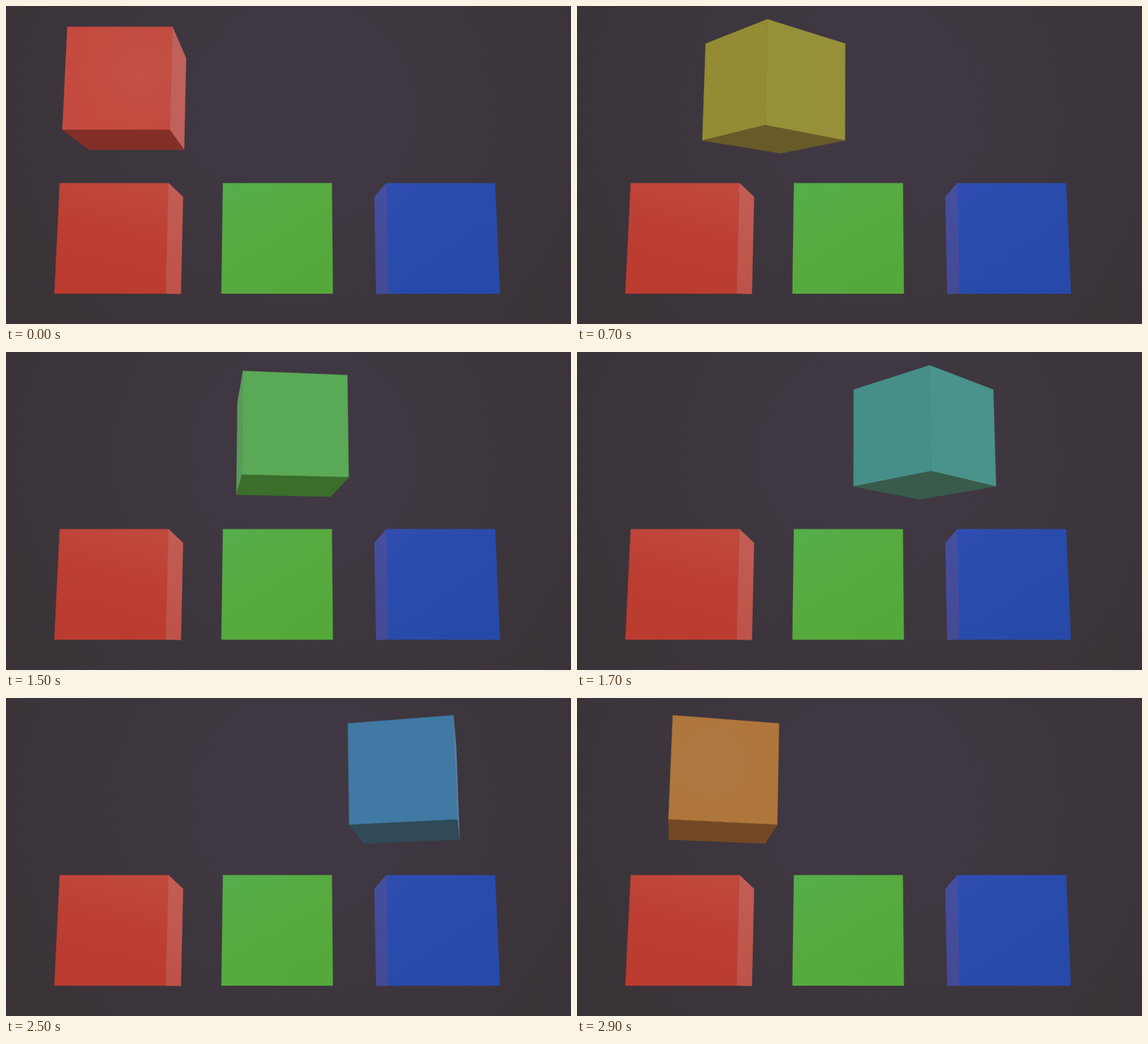
An HTML page with a canvas that plays this animation: 800x450 px, repeating every 3000 ms.

```html
<!DOCTYPE html>
<html lang="en">
<head>
<meta charset="utf-8">
<title>Colour cubes</title>
<style>
  html, body { margin: 0; width: 100%; height: 100%; overflow: hidden; background: #3e3640; }
  canvas { display: block; }
</style>
</head>
<body>
<canvas id="stage" width="800" height="450"></canvas>
<script>
const ctx = document.getElementById('stage').getContext('2d');

// Camera: pitched upwards, cubes are 2 units wide
const FOCAL = 1111, PITCH = 9.5 * Math.PI / 180;
const COS = Math.cos(PITCH), SIN = Math.sin(PITCH);
const DEPTH = 15.28, SHIFT = -0.204, LOW = 1.05, HIGH = 4.05;

function project(x, y, z) {
  const d = y * COS + z * SIN;
  return [400 + FOCAL * x / d, 225 - FOCAL * (z * COS - y * SIN) / d];
}

// Colours are blended in linear light
const toLinear = v => v <= 0.04045 ? v / 12.92 : ((v + 0.055) / 1.055) ** 2.4;
const toSrgb = v => v <= 0.0031308 ? v * 12.92 : 1.055 * v ** (1 / 2.4) - 0.055;
const parse = hex => [0, 2, 4].map(i => toLinear(parseInt(hex.substr(i, 2), 16) / 255));
const css = c => 'rgb(' + c.map(v => Math.round(255 * toSrgb(Math.min(1, v)))) + ')';

const STOPS = [-3, -2.556, -1.5, 0, 1.5, 2.556, 3];
const FRONT = ['c44a3f', 'ae763a', '968f2e', '5cad4a', '42928a', '4079a3', '304db0'].map(parse);
const UNDER = ['832f27', '734824', '685b28', '3a7120', '395b4c', '304b57', '32356a'].map(parse);

function ramp(colours, x) {
  let i = 0;
  while (i < STOPS.length - 2 && x > STOPS[i + 1]) i++;
  const t = (x - STOPS[i]) / (STOPS[i + 1] - STOPS[i]);
  return colours[i].map((v, k) => v + (colours[i + 1][k] - v) * t);
}

// Faces turned sideways get dimmer and pick up a pale sheen
function shade(base, nx) {
  const g = nx ** 4, gain = nx > 0 ? 0.15 : 0.28, sheen = nx > 0 ? 0.062 : 0.034;
  return css(base.map(v => v * (1 - gain * g) + sheen * g));
}

function fill(points, style) {
  ctx.beginPath();
  points.forEach(p => ctx.lineTo(p[0], p[1]));
  ctx.closePath();
  ctx.fillStyle = ctx.strokeStyle = style;
  ctx.lineWidth = 0.4;
  ctx.fill();
  ctx.stroke();
}

function cube(x, z, angle, sideStyle, underStyle) {
  const cx = x + SHIFT, floor = [];
  for (let k = 0; k < 4; k++) {
    const a = angle + k * Math.PI / 2, nx = Math.sin(a), ny = -Math.cos(a);
    const l = [cx + nx + ny, DEPTH + ny - nx], r = [cx + nx - ny, DEPTH + ny + nx];
    floor.push(project(...l, z - 1));
    if (cx * nx + DEPTH * ny + 1 >= 0) continue;
    fill([project(...l, z + 1), project(...r, z + 1),
          project(...r, z - 1), project(...l, z - 1)], sideStyle(nx));
  }
  if (underStyle) fill(floor, underStyle);
}

function gradient(x0, y0, x1, y1, ...colours) {
  const g = ctx.createLinearGradient(x0, y0, x1, y1);
  colours.forEach((c, i) => g.addColorStop(i / (colours.length - 1), c));
  return g;
}

function glow(x, y, radius, inner, outer) {
  const g = ctx.createRadialGradient(x, y, 0, x, y, radius);
  g.addColorStop(0, inner);
  g.addColorStop(1, outer);
  return g;
}

const backdrop = glow(420, 150, 520, '#413945', '#393236');
const fixed = [
  [-3, gradient(180, 250, 140, 407, '#c0483d', '#bd3e32', '#bb3b2f'),
       gradient(0, 250, 0, 407, '#c25e55', '#bd5348')],
  [0, gradient(308, 251, 400, 400, '#55ad4c', '#58ab3f', '#55a93b')],
  [3, gradient(538, 251, 640, 400, '#304db2', '#294bac', '#274aaa'),
      gradient(0, 250, 0, 407, '#464f9f', '#434a96')]
];
const highlight = glow(190, 90, 95, 'rgba(185,150,150,.1)', 'rgba(185,150,150,0)');

// Eased progress in six held steps of 100 ms
function glide(t, start) {
  const u = Math.max(0, Math.min(6, Math.floor((t - start) / 100) + 1)) / 6;
  return u * u * (3 - 2 * u);
}

function draw(now) {
  const t = now % 3000;
  const x = -3 + 3 * glide(t, 500) + 3 * glide(t, 1500) - 6 * glide(t, 2500);
  ctx.fillStyle = backdrop;
  ctx.fillRect(0, 0, 800, 450);
  fixed.forEach(([pos, front, side]) =>
    cube(pos, LOW, 0, nx => Math.abs(nx) > 0.5 ? side : front));
  const base = ramp(FRONT, x);
  cube(x, HIGH, (x + 3) * Math.PI / 6, nx => shade(base, nx), css(ramp(UNDER, x)));
  if (x < -2.4) {
    ctx.fillStyle = highlight;
    ctx.save();
    ctx.beginPath();
    const a = (x + 3) * Math.PI / 6, s = Math.sin(a), c = Math.cos(a);
    [[-1, 1], [1, 1], [1, -1], [-1, -1]].forEach(([w, h]) =>
      ctx.lineTo(...project(x + SHIFT + s + w * c, DEPTH - c + w * s, HIGH + h)));
    ctx.clip();
    ctx.fillRect(80, 0, 230, 210);
    ctx.restore();
  }
  requestAnimationFrame(loop);
}

const begin = performance.now();
function loop() { draw(performance.now() - begin); }
loop();
</script>
</body>
</html>
```
